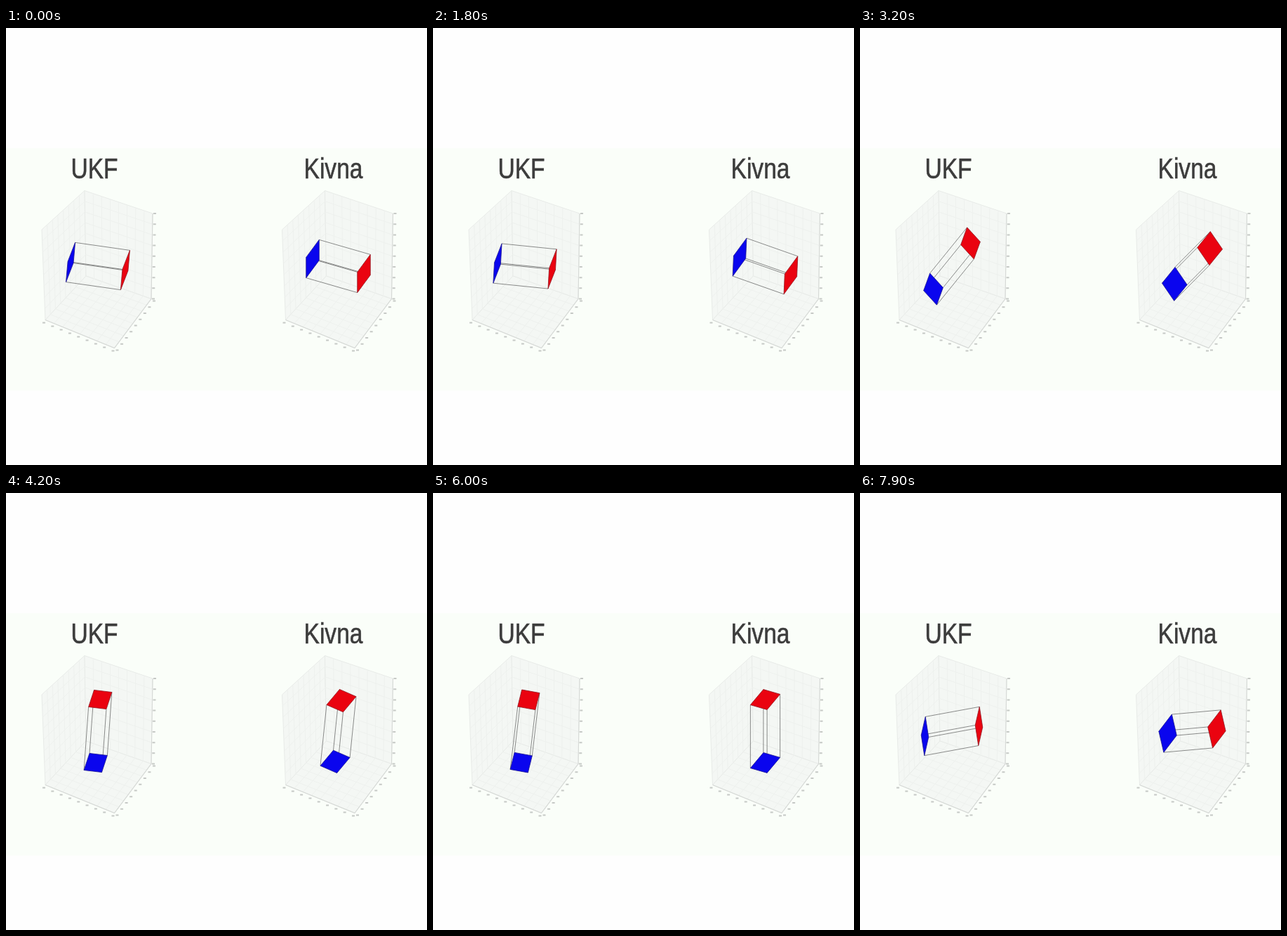
Animation, 600 px wide and 622 px high, one loop 8 s. Source, as an HTML page:

```html
<!DOCTYPE html>
<html lang="en">
<head>
<meta charset="utf-8">
<title>Orientation comparison</title>
<style>
  html, body { margin: 0; width: 100%; height: 100%; overflow: hidden; background: #fefefe; }
  svg { display: block; width: 100vw; height: 100vh; }
  text { font: 40px "Liberation Sans", Arial, sans-serif; fill: #3c3c3c; stroke: #3c3c3c; stroke-width: .6; text-anchor: middle; }
  .pane { fill: #f4f7f4; stroke: #e8ebe8; stroke-width: 1; }
  .grid { fill: none; stroke: #eef1ee; stroke-width: 1; }
  .axis { fill: none; stroke: #d6d9d6; stroke-width: 1.1; }
  .tick { fill: none; stroke: #c6c9c6; stroke-width: 2; }
  .edge { fill: none; stroke: #4a4a4a; stroke-width: .9; stroke-opacity: .7; }
  .face { stroke-width: .8; stroke-linejoin: round; }
</style>
</head>
<body>
<svg id="stage" viewBox="0 0 600 622" preserveAspectRatio="none">
  <rect y="171" width="600" height="345" fill="#fafef9"/>
</svg>
<script>
const stage = document.getElementById('stage');
const LOOP = 8000, STEP = 100;

function add(parent, tag, attrs) {
  const el = document.createElementNS('http://www.w3.org/2000/svg', tag);
  for (const key in attrs) el.setAttribute(key, attrs[key]);
  return parent.appendChild(el);
}
const mix = (a, b, k) => a.map((x, i) => x + (b[i] - x) * k);
const combine = (a, ka, b, kb) => a.map((x, i) => x * ka + b[i] * kb);
const line = (...pts) => 'M' + pts.map(p => p.map(x => x.toFixed(2)).join()).join('L');

// Corners of the plot volume.
const topLeft = [51, 287], topBack = [112, 231.5], topRight = [209, 264];
const lowLeft = [56, 415.5], lowBack = [114, 353], lowRight = [207, 385.5], lowFront = [154.5, 455.5];

function drawAxes(g) {
  const panes = [
    [topLeft, topBack, lowBack, lowLeft],
    [topBack, topRight, lowRight, lowBack],
    [lowLeft, lowBack, lowRight, lowFront]
  ];
  for (const p of panes) add(g, 'path', { class: 'pane', d: line(...p) + 'Z' });
  let grid = '';
  for (const [a, b, c, d] of panes)
    for (let i = 1; i < 8; i++) {
      const k = i / 8;
      grid += line(mix(a, b, k), mix(d, c, k)) + line(mix(a, d, k), mix(b, c, k));
    }
  add(g, 'path', { class: 'grid', d: grid });
  add(g, 'path', { class: 'axis', d: line(lowLeft, lowFront, lowRight, topRight) });
  const ticks = (a, b, dx, dy) => {
    let d = '';
    for (let i = 0; i <= 8; i++) {
      const [x, y] = mix(a, b, i / 8);
      d += line([x + dx - 2, y + dy], [x + dx + 2, y + dy]);
    }
    add(g, 'path', { class: 'tick', d });
  };
  ticks(lowLeft, lowFront, -2, 4);
  ticks(lowFront, lowRight, 4, 3);
  ticks(topRight, lowRight, 3, 0);
}

const ramp = (t, from, to) => Math.min(1, Math.max(0, (t - from) / (to - from)));
const smooth = k => k * k * (3 - 2 * k);
const easeOut = k => k * (2 - k);

// Degrees: rest, swing upright, settle, fall back.
const tilt = (m, t) => m.start
  + m.drift * ramp(t, 0, 1800)
  + m.rise * smooth(ramp(t, 2650, 3650))
  + m.settle * ramp(t, 4200, 6000)
  - m.fall * easeOut(ramp(t, 6400, 7750));

const CENTER = [131, 339];
const UP = -90;          // screen height of the upright long axis
const THICKNESS = .325;  // short side relative to the long side

function makePanel({ title, titleX, shift, flat, upright, depth, turn, motion }) {
  const g = add(stage, 'g', { transform: `translate(${shift})` });
  add(g, 'text', { transform: `translate(${titleX} 214) scale(.84 1)` }).textContent = title;
  drawAxes(g);
  const edges = add(g, 'path', { class: 'edge' });
  const blue = add(g, 'path', { class: 'face', fill: '#0a05ee', stroke: '#1a1490' });
  const red = add(g, 'path', { class: 'face', fill: '#ea0310', stroke: '#901520' });

  return t => {
    const angle = tilt(motion, t) * Math.PI / 180;
    const c = Math.cos(angle), s = Math.sin(angle);
    const axis = combine(flat, c, upright, s);
    const side = combine(flat, s * THICKNESS, upright, -c * THICKNESS);
    const back = [depth[0] + turn * ramp(t, 1800, 6000), depth[1] - 3 * s];
    const end = sign => [[-1, -1], [1, -1], [1, 1], [-1, 1]].map(([a, b]) =>
      CENTER.map((x, i) => x + (sign * axis[i] + a * side[i] + b * back[i]) / 2));
    const near = end(-1), far = end(1);
    edges.setAttribute('d', near.map((p, i) => line(p, far[i])).join(''));
    blue.setAttribute('d', line(...near) + 'Z');
    red.setAttribute('d', line(...far) + 'Z');
  };
}

const panels = [
  makePanel({
    title: 'UKF', titleX: 126, shift: 0,
    flat: [78, 9.5], upright: [6.5, UP], depth: [-10.5, 27], turn: 4.5,
    motion: { start: -1, drift: 2, rise: 89, settle: -3, fall: 72 }
  }),
  makePanel({
    title: 'Kivna', titleX: 124, shift: 342.5,
    flat: [73, 21], upright: [0, UP], depth: [-18.5, 25], turn: 0,
    motion: { start: 0, drift: -3, rise: 86, settle: 7, fall: 73 }
  })
];

function render(t) {
  for (const draw of panels) draw(t);
}

const start = performance.now();
function tick(now) {
  render(Math.floor(Math.max(0, now - start) % LOOP / STEP) * STEP);
  requestAnimationFrame(tick);
}
render(0);
requestAnimationFrame(tick);
</script>
</body>
</html>
```
